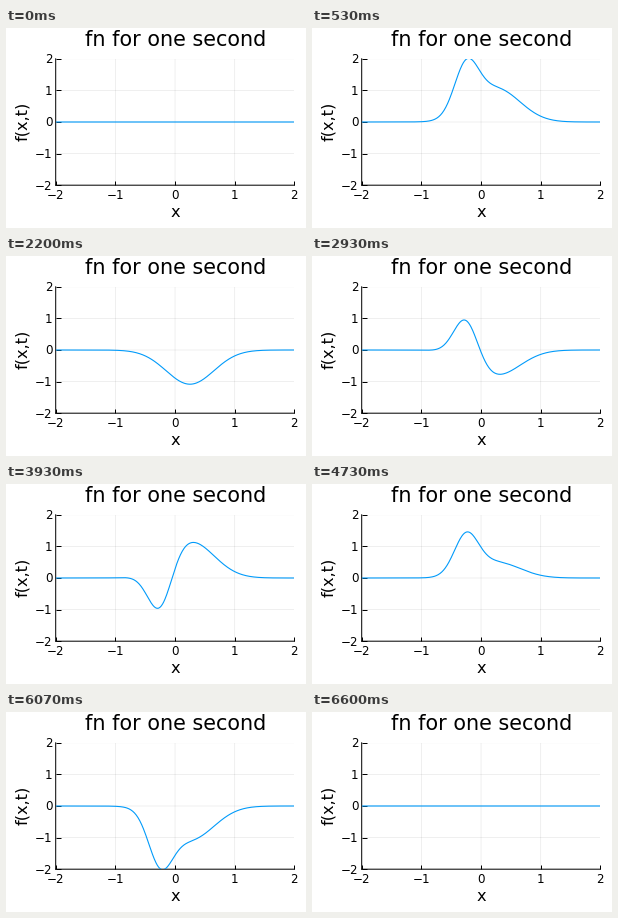
A matplotlib script for the animation above (6.67 s loop, 300x200 px).

```python
import numpy as np
import matplotlib.pyplot as plt
from matplotlib.animation import FuncAnimation

W, H, DPI = 300, 200, 100
POSES, HOLD, LOOP_MS = 100, 4, 6670
TICKS_PER_LOOP = POSES * HOLD
LEFT, RIGHT, TOP, BOTTOM = 49.7, 288.4, 30.8, 157.2
MARKS = range(-2, 3)
PX = 72 / DPI  # points per pixel

plt.rcParams["font.family"] = "DejaVu Sans"


def bump(x, mu, sigma):
    return np.exp(-0.5 * ((x - mu) / sigma) ** 2)


def f(x, t):
    return (1.5 * bump(x, -0.25, 0.2) * np.sin(6 * np.pi * t)
            + 1.25 * bump(x, 0.25, 0.4) * np.sin(4 * np.pi * t))


def label(x, y, s, size, ha="center", rotation=0):
    """Text in pixels from the top left; y is the baseline."""
    fig.text(x / W, 1 - y / H, s, fontsize=size * PX, ha=ha, va="baseline",
             rotation=rotation, rotation_mode="anchor")


fig = plt.figure(figsize=(W / DPI, H / DPI), dpi=DPI, facecolor="white")
ax = fig.add_axes([LEFT / W, 1 - BOTTOM / H,
                   (RIGHT - LEFT) / W, (BOTTOM - TOP) / H])
ax.set(xlim=(-2, 2), ylim=(-2, 2), xticks=MARKS, yticks=MARKS)
ax.set_axisbelow(True)
ax.grid(color="black", alpha=0.1, linewidth=0.6 * PX, snap=False)
ax.tick_params(direction="in", length=4.5 * PX, width=PX,
               labelbottom=False, labelleft=False)
for side in ("top", "right"):
    ax.spines[side].set_visible(False)
for side in ("left", "bottom"):
    ax.spines[side].set(linewidth=PX, snap=False)

for v in MARKS:
    name = str(v).replace("-", "\u2212")
    k = (v + 2) / 4
    label(LEFT + k * (RIGHT - LEFT), 171, name, 11.9)
    label(46.5, BOTTOM - k * (BOTTOM - TOP) + 4.4, name, 11.9, ha="right")

label(169.8, 18.4, "fn for one second", 20.8)
label(169, 189, "x", 16.3)
label(20.7, 93.7, "f(x,t)", 16.3, rotation=90)

xs = np.linspace(-2, 2, 401)
curve, = ax.plot(xs, f(xs, 0), color="#009AFA", linewidth=1.1 * PX,
                 snap=False, zorder=3)


def update(i):
    # poses change one tick early, so none lags behind 15 fps
    pose = (i + 1) // HOLD % POSES
    curve.set_ydata(f(xs, pose / (POSES - 1)))
    return curve,


anim = FuncAnimation(fig, update, frames=TICKS_PER_LOOP,
                     interval=LOOP_MS / TICKS_PER_LOOP,
                     repeat=True, repeat_delay=0)
plt.show()
```
